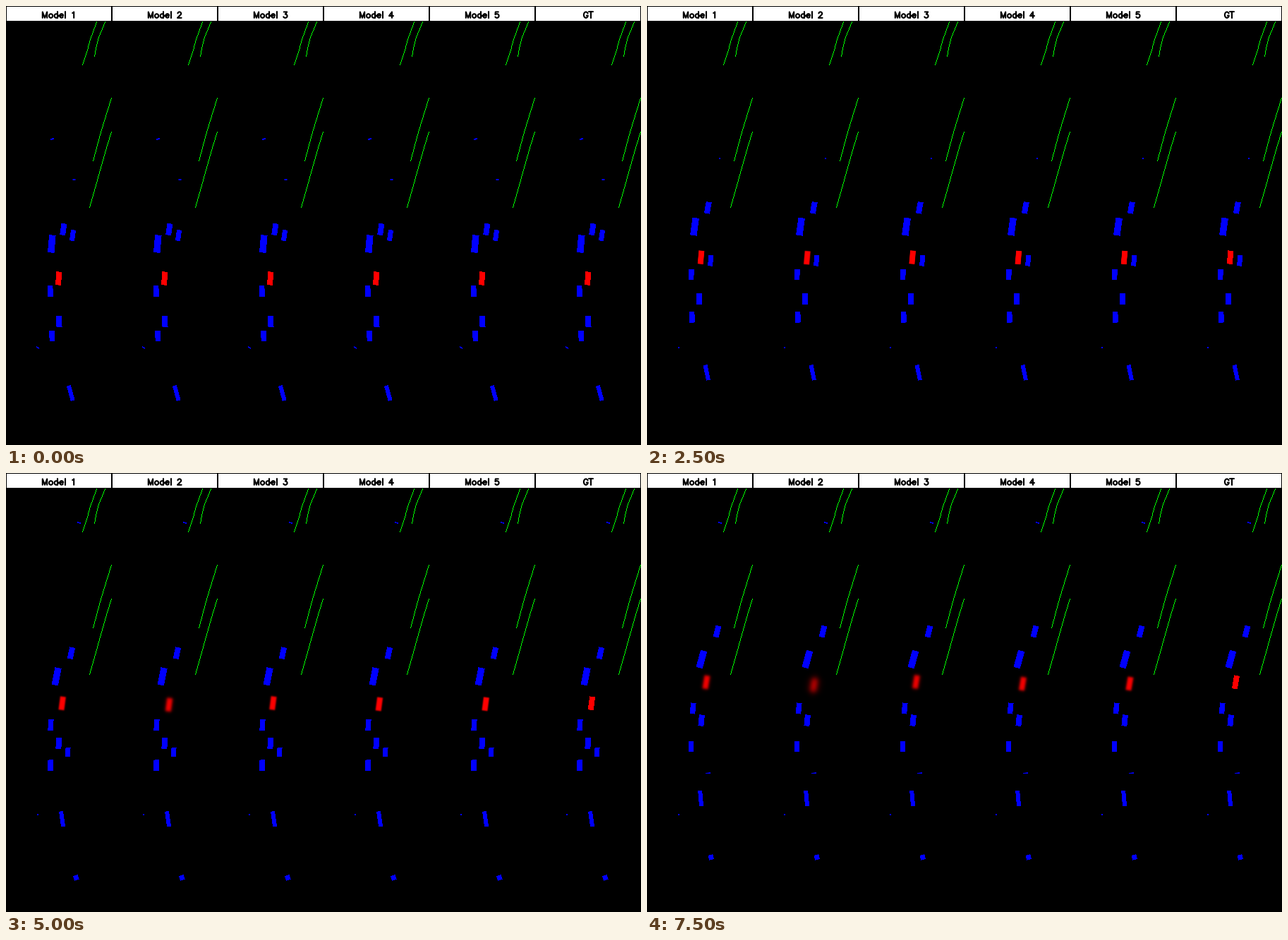
A matplotlib script for the animation above (8000 ms loop, 900 by 622 pixels).

```python
import matplotlib.pyplot as plt
import numpy as np
from matplotlib.animation import FuncAnimation
from matplotlib.collections import LineCollection

W, H, DPI = 900, 622, 100
PANEL, HEAD = 150, 22
FRAMES, STEP = 16, 500
TITLES = [f"Model {i}" for i in range(1, 6)] + ["GT"]
SHARP = 0.01
Y, X = np.mgrid[:H, :PANEL]


# Single-stroke lettering on a 21-unit cap height
def arc(cx, cy, rx, ry, a, b):
    t = np.radians(np.linspace(a, b, 17))
    return list(zip(cx + rx * np.cos(t), cy + ry * np.sin(t)))


BOWL = arc(9.5, 7, 6.5, 7, 0, 360)
GLYPHS = {
    " ": (16, []),
    "M": (24, [[(4, 0), (4, 21), (12, 0), (20, 21), (20, 0)]]),
    "o": (19, [BOWL]),
    "d": (19, [BOWL, [(15, 21), (15, 0)]]),
    "e": (18, [[(3, 8), (15, 8)] + arc(9.3, 7.3, 6.2, 6.9, 10, 320)]),
    "l": (8, [[(4, 21), (4, 0)]]),
    "1": (20, [[(6, 17), (8, 18), (11, 21), (11, 0)]]),
    "2": (20, [arc(10, 15, 6, 6, 170, -25) + [(13, 10), (3, 0), (17, 0)]]),
    "3": (20, [[(5, 21), (16, 21), (10, 13)] + arc(10, 6.5, 7, 6.5, 80, -155)]),
    "4": (20, [[(13, 0), (13, 21), (3, 7), (18, 7)]]),
    "5": (20, [[(15, 21), (5, 21), (4, 12)] + arc(10, 7, 7, 7, 125, -150)]),
    "G": (21, [arc(10.8, 10.5, 7.6, 10.5, 30, 330) + [(18, 8), (13, 8)]]),
    "T": (16, [[(8, 21), (8, 0)], [(1, 21), (15, 21)]]),
}


def lettering(text, mid, base, scale=0.4):
    x = mid - scale * sum(GLYPHS[c][0] for c in text) / 2
    strokes = []
    for c in text:
        width, lines = GLYPHS[c]
        strokes += [[(x + scale * a, base - scale * b) for a, b in s] for s in lines]
        x += scale * width
    return strokes


class Lane:
    """Curve x(y) around its leftmost point; cars face along it."""

    def __init__(self, x0, y0, curve, skew=0.0):
        self.x0, self.y0, self.curve, self.skew = x0, y0, curve, skew

    def at(self, y):
        d = y - self.y0
        x = self.x0 + self.curve * d ** 2 + self.skew * d ** 3
        slope = 2 * self.curve * d + 3 * self.skew * d ** 2
        return x, y, -np.arctan(slope)


INNER = Lane(73.5, 412, 8.6e-4, 7.4e-7)
OUTER = Lane(62.2, 390, 6e-4, -2.5e-6)
ONCOMING = Lane(86.5, 428, 7e-4)

# lane, first y, pixels per frame, width, height
CARS = [
    (INNER, 316, 6.13, 8, 16.5),
    (INNER, 446.5, 6.43, 8, 16),
    (INNER, 548, 5.83, 6, 22),
    (INNER, 631, 5.8, 7, 7),
    (OUTER, 336.5, 4.87, 9.5, 25),
    (OUTER, 403.5, 4.7, 7.5, 15.5),
    (OUTER, 467, 5.33, 7.5, 15.5),
]

# Final blur and drift of each model's guess; the truth has none
BLUR = [2, 4.2, 2.2, 1.9, 1.6, SHARP]
DRIFT = [(-0.5, 0), (2.2, 4), (-3, -0.5), (-2, 2.2), (-0.5, 2), (0, 0)]


def cover(cx, cy, angle, w, h, blur=SHARP):
    """Share of each panel pixel under a turned box with soft edges."""
    c, s = np.cos(angle), np.sin(angle)
    u = (X - cx) * c + (Y - cy) * s
    v = (Y - cy) * c - (X - cx) * s

    def edge(p, r):
        return (np.tanh(0.85 * (p + r) / blur) - np.tanh(0.85 * (p - r) / blur)) / 2

    return edge(u, w / 2) * edge(v, h / 2)


def trace(img, *points):
    """One-pixel green line, one dot per row."""
    xs, ys = zip(*points)
    rows = np.arange(ys[0], ys[-1] + 1)
    cols = np.rint(np.interp(rows, ys, xs)).astype(int)
    img[rows, cols] = (0, 1, 0)


def backdrop():
    img = np.zeros((H, PANEL, 3))
    img[1:HEAD - 1, 1:-1] = 1
    trace(img, (128, 22), (118, 50), (115, 62), (108, 83))
    trace(img, (140, 22), (131, 44), (128, 55), (125, 71))
    trace(img, (149, 130), (138, 165), (133, 182), (123, 219))
    trace(img, (149, 178), (143, 197), (118, 285))
    return img


BACK = backdrop()


def specks(k):
    """Slivers of far-off cars."""
    yield cover(44.5, 483.5, 0.5, max(4.5 - k / 2, 2.5), 2)
    if k == 0:
        yield cover(65, 188, -0.15, 5, 2)
    if k < 6:
        yield cover(96 + 1.25 * k, 245.8 - 6.15 * k, 0, 4 - k / 3, 2)
    if k > 6:
        yield cover(103, 70, 0.2, 5, 1.6)


def scene(k):
    panel = BACK.copy()
    blue = panel[..., 2]
    masks = [cover(*lane.at(y - v * k), w, h) for lane, y, v, w, h in CARS if y - v * k < 588]
    # The oncoming car slips out of view from its front end
    masks.append(cover(*ONCOMING.at(324.5 + 7.15 * k), 7, 15.5) * (Y < 354 + 4.8 * k))
    for mask in masks + list(specks(k)):
        np.maximum(blue, mask, out=blue)

    x, y, angle = INNER.at(385.5 - 5.97 * k)
    grow = (max(k - 2, 0) / (FRAMES - 3)) ** 1.4
    panels = []
    for blur, (dx, dy) in zip(BLUR, DRIFT):
        guess = panel.copy()
        red = cover(x + dx * grow, y + dy * grow, angle, 8, 19, max(blur * grow, SHARP))
        guess[..., 0] = np.maximum(guess[..., 0], red)
        panels.append(guess)
    return np.hstack(panels)


fig = plt.figure(figsize=(W / DPI, H / DPI), dpi=DPI, facecolor="black")
ax = fig.add_axes([0, 0, 1, 1])
view = ax.imshow(scene(0), extent=(0, W, H, 0), aspect="auto", interpolation="nearest")
ax.axis("off")

strokes = []
for i, title in enumerate(TITLES):
    strokes += lettering(title, (i + 0.5) * PANEL, 16.8)
ax.add_collection(LineCollection(strokes, colors="black", linewidths=2.1 * 72 / DPI,
                                 capstyle="round"), autolim=False)


def draw(k):
    view.set_data(scene(k))
    return (view,)


anim = FuncAnimation(fig, draw, frames=FRAMES, init_func=lambda: draw(0),
                     interval=STEP, repeat=True, repeat_delay=0, blit=False)
plt.show()
```
